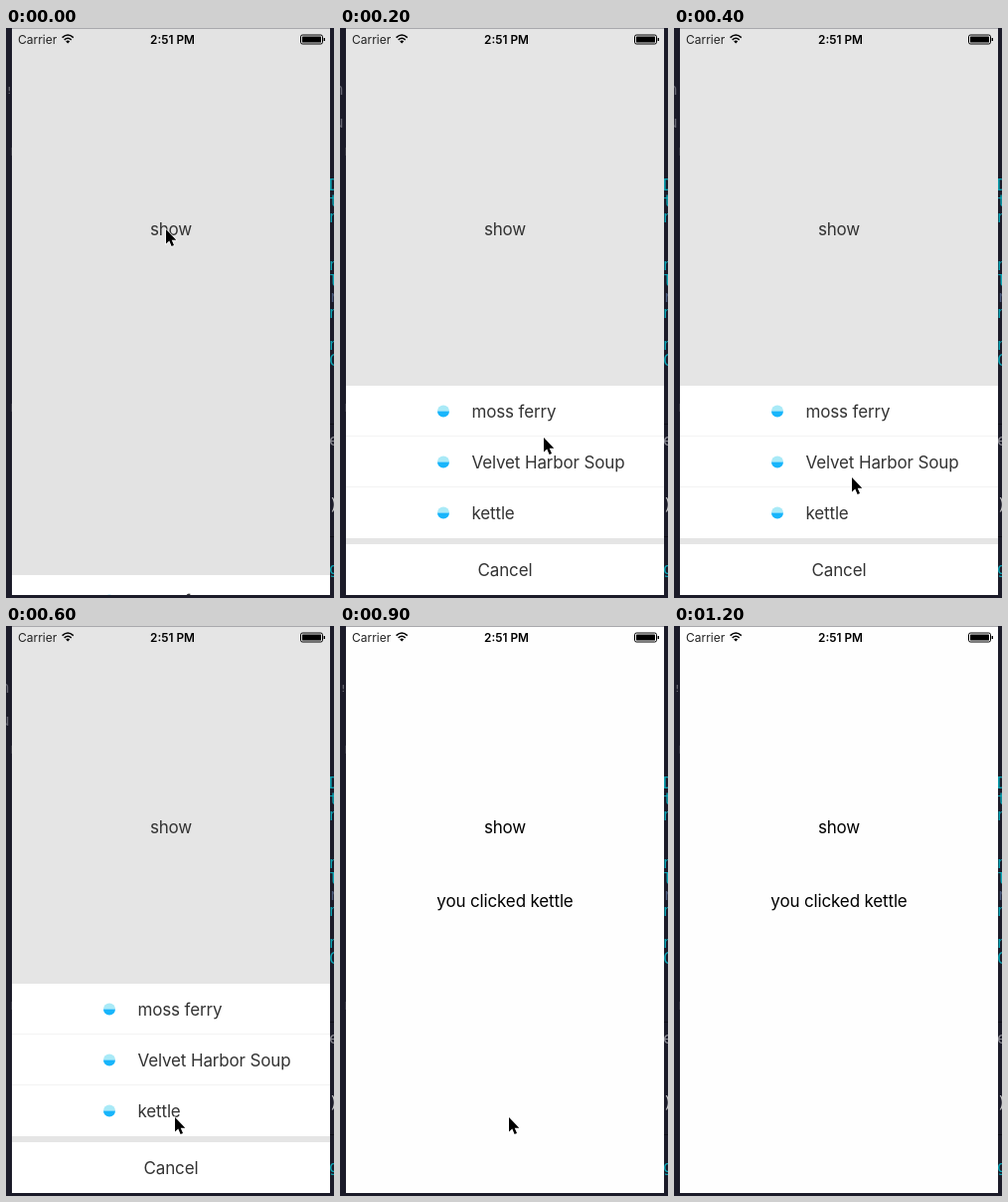
These frames come from a looping animation (330 px wide and 572 px high, 1300 ms). An HTML page:

```html
<!DOCTYPE html>
<html lang="en">
<head>
<meta charset="utf-8">
<title>Action sheet</title>
<style>
  html, body { margin: 0; width: 100%; height: 100%; overflow: hidden; background: #1b1b29; }
  svg { display: block; font-family: Inter, "Open Sans", sans-serif; }
  .label { font-size: 17px; letter-spacing: -.15px; }
  .mid { text-anchor: middle; }
  .code { font: 16px "DejaVu Sans Mono", monospace; }
</style>
</head>
<body>
<svg width="330" height="572" viewBox="0 0 330 572">
  <defs>
    <clipPath id="screen"><rect x="6" width="320" height="569"/></clipPath>
  </defs>
  <rect width="330" height="572" fill="#1b1b29"/>
  <g id="editor" class="code"></g>

  <g clip-path="url(#screen)">
    <rect id="back" x="6" width="320" height="569"/>
    <path d="M6 .5H326" stroke="#a9a9ad"/>
    <g font-size="12">
      <text x="12" y="16" fill="#222">Carrier</text>
      <text x="167.5" y="16" class="mid" font-weight="600" font-size="11.8">2:51 PM</text>
    </g>
    <g fill="none" stroke="#000" stroke-width="1.5">
      <path d="M56.6 9.6Q62.2 4.4 67.8 9.6M58.7 11.9Q62.2 8.7 65.7 11.9"/>
      <path d="M60.2 13.4Q62.2 11.8 64.2 13.4L62.2 15.6Z" fill="#000" stroke="none"/>
      <rect x="296.5" y="7" width="22" height="9" rx="1.8" stroke-width="1"/>
      <rect x="298" y="8.5" width="19" height="6" rx=".6" fill="#000" stroke="none"/>
      <path d="M320.3 10V13" stroke-width="1.4"/>
    </g>
    <text id="show" class="label mid" x="166" y="207.5">show</text>
    <text id="result" class="label mid" x="166" y="282"></text>
    <g id="sheet" class="label" fill="#333">
      <rect x="6" width="320" height="153" fill="#fff"/>
      <rect x="6" y="159" width="320" height="51" fill="#fff"/>
      <path d="M6 50.5H326M6 101.5H326" stroke="#f3f3f3"/>
      <g id="rows"></g>
      <text class="mid" x="166" y="191">Cancel</text>
    </g>
  </g>

  <circle id="ring" cx="171" cy="495" r="20" fill="none" stroke="#000" stroke-width="3"/>
  <path id="cursor" d="M0 0V14.5L3.3 11.4L5.6 17L8 16L5.7 10.7H10.3Z"
        stroke="#fff" stroke-width="1.3" paint-order="stroke"/>
</svg>
<script>
const STEP = 100, LOOP = 1300;
const shows = ["moss ferry", "Velvet Harbor Soup", "kettle"];
const path = [[161, 202], [161, 202], [205, 411], [196, 430], [179, 451], [174, 474],
              [170, 493], [170, 493], [170, 493], [170, 493], [170, 493]];
const tops = [549, 416, 359];
const $ = id => document.getElementById(id);
const visible = (id, on) => $(id).setAttribute("visibility", on ? "visible" : "hidden");
const move = (id, x, y) => $(id).setAttribute("transform", `translate(${x} ${y})`);

// Slivers of the editor on both sides of the phone
const cyan = "#0aa5b5", grey = "#8a8a92";
const slivers = [
  [158, "D"], [174, "t"], [190, "n"], [238, "n"], [254, "l"], [270, "r", "#4a5a7c"],
  [286, "n"], [318, "n"], [334, "C"], [414, "e", grey], [478, ")", "#ccc"], [543, "g"]
];
$("editor").innerHTML = slivers.map(([y, s, c = cyan]) =>
  `<text x="325" y="${y + 5}" fill="${c}">${s}</text>`).join("") +
  `<g id="marksA" fill="${grey}" font-size="9"><text x="-5" y="66">!!</text></g>
   <g id="marksB" fill="#666672"><text x="-6" y="67">n</text><text x="-6" y="100">u</text></g>
   <path d="M5.5 120V128M5.5 377V385" stroke="#33333f"/>
   <path d="M326 397.5H330M326 510.5H330" stroke="#0e0e16"/>`;

$("rows").innerHTML = shows.map((name, i) => {
  const y = i * 51 + 25.5;
  return `<path d="M98 ${y}a6 6 0 0 1 12 0z" fill="#a9eaf7"/>
    <path d="M98 ${y}a6 6 0 0 0 12 0z" fill="#18b5fb"/>
    <text x="132.5" y="${y + 6.5}">${name}</text>`;
}).join("");
const [lightHalf, darkHalf] = [...$("rows").querySelectorAll("path")].slice(-2);

function draw(now) {
  const n = Math.floor(now % LOOP / STEP);
  const open = n < 9, pressed = n === 8;

  $("back").setAttribute("fill", n === 0 ? "#e3e3e3" : open ? "#e5e5e5" : "#fefefe");
  $("show").setAttribute("fill", open ? "#333" : "#000");
  $("result").textContent = open ? "" : "you clicked " + shows[2];

  visible("sheet", open);
  move("sheet", 0, tops[Math.min(n, 2)]);
  lightHalf.setAttribute("fill", pressed ? "#b4fba2" : "#a9eaf7");
  darkHalf.setAttribute("fill", pressed ? "#62f51c" : "#18b5fb");

  visible("ring", pressed);
  visible("cursor", n < path.length);
  if (n < path.length) move("cursor", ...path[n]);

  const shifted = n > 0 && open;
  visible("marksA", !shifted);
  visible("marksB", shifted);
}

const start = performance.now();
function tick() {
  draw(performance.now() - start);
  requestAnimationFrame(tick);
}
tick();
</script>
</body>
</html>
```
